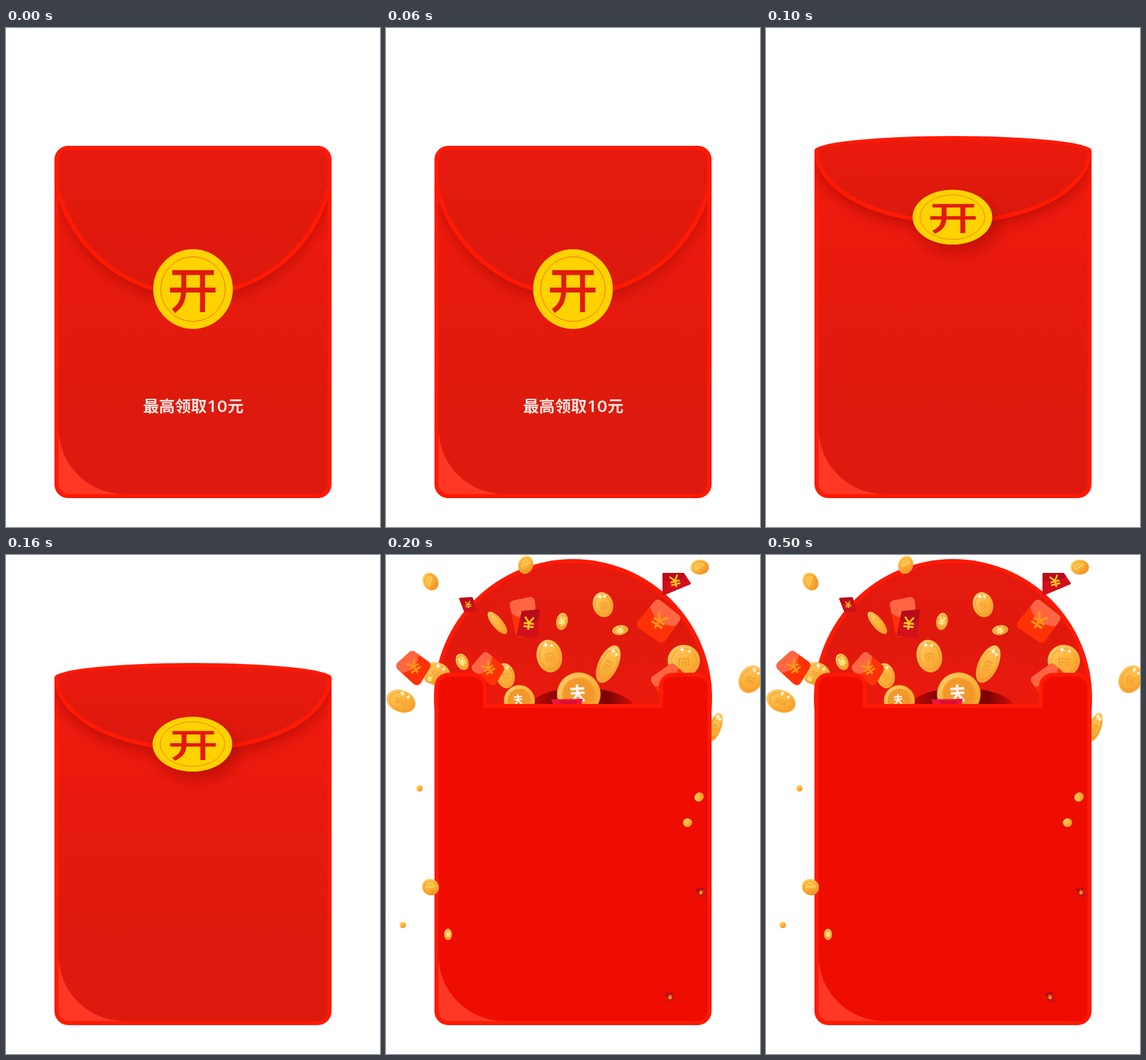
Write an HTML page with a canvas that moves like this. It is 648 px wide and 864 px high and loops after 0.7 s.

```html
<!DOCTYPE html>
<html lang="zh-CN">
<head>
<meta charset="utf-8">
<title>红包</title>
<style>
html, body { margin: 0; width: 100%; height: 100%; overflow: hidden; background: #fff; }
canvas { display: block; width: 648px; height: 864px; }
</style>
</head>
<body>
<canvas id="stage" width="648" height="864"></canvas>
<script>
const ctx = document.getElementById('stage').getContext('2d');
const TAU = Math.PI * 2, DEG = Math.PI / 180;
const EDGE = '#ff1a05', GOLD = '#ffd200', MARK = '#e21a0c';

function vertical(y0, y1, ...colors) {
  const g = ctx.createLinearGradient(0, y0, 0, y1);
  colors.forEach((c, i) => g.addColorStop(i / (colors.length - 1), c));
  return g;
}

function local(x, y, angle, draw) {
  ctx.save();
  ctx.translate(x, y);
  ctx.rotate(angle * DEG);
  draw();
  ctx.restore();
}

function ellipse(x, y, rx, ry) {
  const p = new Path2D();
  p.ellipse(x, y, rx, ry, 0, 0, TAU);
  return p;
}

function box(x, y, w, h, radii) {
  const p = new Path2D();
  p.roundRect(x, y, w, h, radii);
  return p;
}

function fill(path, style) {
  ctx.fillStyle = style;
  ctx.fill(path);
}

function shadow(alpha, blur, dx, dy) {
  ctx.shadowColor = `rgba(140,0,0,${alpha})`;
  ctx.shadowBlur = blur;
  ctx.shadowOffsetX = dx;
  ctx.shadowOffsetY = dy;
}

// Light corner at the lower left of the envelope
function fold() {
  const p = new Path2D('M91 693A114 114 0 0 0 205 807H109A18 18 0 0 1 91 789Z');
  fill(p, '#ff3826');
}

function envelope(top, r) {
  const outer = box(84, top, 480, 814 - top, [r, r, 24, 24]);
  const q = r ? 18 : 0;
  const inner = box(91, top + 7, 466, 800 - top, [q, q, 18, 18]);
  fill(outer, EDGE);
  fill(inner, vertical(204, 814, '#f21b0d', '#eb1a0d', '#e31a0d', '#dd1a0d', '#dd1a0d'));
  fold();
  return { outer, inner };
}

function seal(x, y, sy, markX) {
  ctx.save();
  ctx.translate(x, y);
  ctx.scale(1, sy);
  fill(ellipse(0, 0, 69, 69), GOLD);
  ctx.shadowColor = 'transparent';
  ctx.strokeStyle = '#e8690c';
  ctx.lineWidth = 1;
  ctx.stroke(ellipse(0, 0, 56, 56));
  ctx.translate(markX, 0);
  ctx.strokeStyle = MARK;
  ctx.lineWidth = 8.6;
  ctx.stroke(new Path2D('M-36-28.5H36M-40 1.8H39M16.5-28V40M-16-28V-2C-16 18-20 28-34 38'));
  ctx.restore();
}

function label() {
  ctx.fillStyle = '#fde6e2';
  ctx.textAlign = 'left';
  ctx.font = 'bold 27.6px "Noto Sans CJK SC", "Noto Sans CJK", sans-serif';
  ctx.fillText('最高领取', 237.5, 665);
  ctx.fillText('元', 384, 665);
  ctx.font = '600 27.6px Inter, sans-serif';
  ctx.textAlign = 'center';
  ctx.fillText('1', 356, 665);
  ctx.fillText('0', 374.5, 665);
}

function closed() {
  const { outer, inner } = envelope(204, 24);
  const flap = ellipse(324, 219, 246, 246);
  ctx.save();
  ctx.clip(inner);
  ctx.save();
  shadow(0.38, 22, 0, 9);
  fill(flap, EDGE);
  ctx.restore();
  fill(ellipse(324, 219, 239, 239), vertical(211, 458, '#e61a0e', '#dc190d'));
  ctx.restore();
  ctx.save();
  ctx.clip(outer);
  ctx.strokeStyle = EDGE;
  ctx.lineWidth = 7;
  ctx.stroke(box(87.5, 207.5, 473, 603, 20.5));
  ctx.restore();
  seal(324, 452, 1, 0);
  label();
}

// Flap seen at an angle: shallow arc above, deep arc below
function lens(rx, up, down) {
  const p = new Path2D();
  p.ellipse(324, 212, rx, up, 0, Math.PI, TAU);
  p.ellipse(324, 212, rx, down, 0, 0, Math.PI);
  return p;
}

function lifting() {
  const { outer } = envelope(212, 0);
  ctx.save();
  ctx.clip(outer);
  shadow(0.45, 24, 0, 10);
  fill(lens(240, 25, 127), EDGE);
  ctx.restore();
  fill(lens(240, 25, 127), EDGE);
  fill(lens(233, 18, 120), vertical(194, 332, '#ea1a0d', '#db190d'));
  ctx.save();
  shadow(0.42, 26, 8, 14);
  seal(323, 327.5, 0.69, 1.5);
  ctx.restore();
}

function yen(x, y, size, angle, color) {
  local(x, y, angle, () => {
    ctx.scale(size / 20, size / 20);
    ctx.strokeStyle = color;
    ctx.lineWidth = 3;
    ctx.stroke(new Path2D('M-7-10L0-1L7-10M0-1V10M-8 0H8M-8 5H8'));
  });
}

function coin(x, y, rx, ry, angle, look) {
  local(x, y, angle, () => {
    const g = ctx.createLinearGradient(-rx, -ry, rx, ry);
    g.addColorStop(0, look === 'small' ? '#ffe06a' : '#ffcf70');
    g.addColorStop(0.5, '#ffb53c');
    g.addColorStop(1, look === 'small' ? '#e97f16' : '#f59a2e');
    fill(ellipse(0, 0, rx, ry), g);
    if (Math.min(rx, ry) < 8 && look !== 'yen') return;
    ctx.strokeStyle = '#f29a2c';
    ctx.lineWidth = 1.2;
    ctx.stroke(ellipse(0.5, 0.5, rx * 0.78, ry * 0.78));
    if (look === 'small') {
      ctx.strokeStyle = '#ffe58a';
      ctx.stroke(new Path2D(`M${-rx * 0.5} ${ry * 0.3}Q0 0 ${rx * 0.5} ${-ry * 0.4}`));
    }
    if (look === 'shine') {
      ctx.strokeStyle = '#ed9a35';
      ctx.lineWidth = 1.6;
      ctx.save();
      ctx.scale(rx / 24, ry / 24);
      ctx.stroke(new Path2D('M-7 8V-3H7V8M-3 8V2H3V8'));
      ctx.restore();
      sparkle(-rx * 0.1, -ry * 0.7, 5);
      sparkle(rx * 0.35, -ry * 0.6, 4);
    }
  });
  if (look === 'yen') yen(x, y, Math.max(rx, ry) * 0.95, angle, '#fff0a0');
}

function sparkle(x, y, r) {
  const p = new Path2D();
  for (let i = 0; i < 8; i++) {
    const d = i % 2 ? r * 0.45 : r, a = i * TAU / 8;
    p.lineTo(x + d * Math.cos(a), y + d * Math.sin(a));
  }
  fill(p, '#fff6e0');
}

function rounded(pts, r) {
  const p = new Path2D(), n = pts.length;
  const [a, b] = [pts[0], pts[n - 1]];
  p.moveTo((a[0] + b[0]) / 2, (a[1] + b[1]) / 2);
  pts.forEach((c, i) => p.arcTo(...c, ...pts[(i + 1) % n], r));
  p.closePath();
  return p;
}

// Corners run from the top left, clockwise
function packet(a, b, c, d, dark, angle, size) {
  const mix = (p, q, k) => [p[0] + (q[0] - p[0]) * k, p[1] + (q[1] - p[1]) * k];
  const shape = rounded([a, b, c, d], dark ? 2 : 8);
  fill(shape, dark ? '#d0101a' : '#ff3207');
  ctx.save();
  ctx.clip(shape);
  const l = mix(a, d, 0.32), r = mix(b, c, 0.32), m = mix(mix(a, d, 0.68), mix(b, c, 0.68), 0.5);
  const flap = new Path2D();
  flap.moveTo(...a);
  flap.lineTo(...b);
  flap.lineTo(...r);
  flap.quadraticCurveTo(...m, ...l);
  flap.closePath();
  fill(flap, dark ? '#b90c18' : '#ff6543');
  ctx.restore();
  const mid = mix(mix(a, c, 0.5), mix(b, d, 0.5), 0.5);
  yen(...mid, size, angle, dark ? '#ffc51e' : '#ff9418');
}

function pocket() {
  const p = new Path2D('M87.5 228A20.5 20.5 0 0 1 108 207.5H151A20.5 20.5 0 0 1 171.5 228V261.5H476.5V228A20.5 20.5 0 0 1 497 207.5H540A20.5 20.5 0 0 1 560.5 228V790A20.5 20.5 0 0 1 540 810.5H108A20.5 20.5 0 0 1 87.5 790Z');
  fill(p, '#ee0d00');
  fold();
  ctx.strokeStyle = EDGE;
  ctx.lineWidth = 7;
  ctx.stroke(p);
}

function insides() {
  const g = ctx.createLinearGradient(245, 0, 430, 0);
  ['#cc0c08', '#8d0305', '#a00406', '#790204', '#d80e08'].forEach((c, i) => g.addColorStop(i / 4, c));
  ctx.save();
  ctx.beginPath();
  ctx.rect(170, 150, 310, 109);
  ctx.clip();
  fill(ellipse(338, 270, 95, 40), g);
  for (const [x, y, r, size] of [[231, 252, 27, 18], [334, 241, 38, 30]]) {
    fill(ellipse(x, y, r, r), '#ee8f24');
    coin(x, y, r - 1, r - 1, 0, 'plain');
    fill(ellipse(x, y, r * 0.72, r * 0.72), '#f3982a');
    yen(x - 2, y - 2, size, 176, '#fff3ea');
  }
  fill(new Path2D('M286 250L341 249L338 260H290Z'), '#f0143f');
  fill(new Path2D('M300 253L332 252L328 260H304Z'), '#d80d32');
  ctx.restore();
}

function open() {
  coin(570, 298, 11, 26, 20, 'shine');
  fill(ellipse(324, 248, 241, 241), EDGE);
  fill(ellipse(324, 248, 234, 234), vertical(14, 260, '#e61a0e', '#e0190d', '#ea1a0d'));
  insides();

  coin(88, 206, 24, 20, 20, 'shine');
  coin(207, 209, 16, 22, -12, 'shine');
  coin(376, 86, 17.5, 22, -15, 'shine');
  coin(193, 117.5, 9, 24, -40, 'plain');
  coin(283, 175, 22, 28.5, -12, 'shine');
  coin(385, 189, 17, 35, 25, 'shine');
  coin(516, 183, 28, 27.5, 0, 'shine');
  coin(26, 253, 26, 19, 22, 'shine');
  coin(632, 215, 20, 25, 28, 'shine');

  coin(77, 46, 13, 16, -30, 'small');
  coin(242, 17, 13, 16, 15, 'small');
  coin(543.5, 21, 16, 13, 0, 'small');
  coin(305, 115, 10, 15, 10, 'yen');
  fill(ellipse(410, 130, 14, 10), 'rgba(190,20,10,.5)');
  coin(406, 130, 14, 8.5, -8, 'yen');
  coin(132, 185, 10.5, 15, -25, 'yen');

  packet([126, 74], [150, 73], [158, 97], [136, 100], true, -10, 12);
  packet([479, 31], [516, 31], [529, 50], [479, 71], true, -15, 20);
  packet([213, 80], [257, 71], [264, 136], [226, 144], false, -8, 20);
  packet([235, 97], [267, 94], [262, 143], [226, 140], true, 6, 22);
  packet([470, 74], [513, 108], [479, 155], [431, 122], false, 34, 28);
  packet([14, 192], [45, 164], [80, 189], [55, 230], false, -34, 24);
  packet([145, 196], [172, 165], [207, 195], [187, 230], false, -36, 23);
  packet([456, 214], [496, 186], [530, 216], [486, 258], false, -30, 20);

  pocket();

  coin(76, 214, 10, 8, 20, 'yen');
  coin(58, 404, 5.5, 5.5, 0, 'small');
  coin(542.5, 419, 8.5, 7.5, -40, 'small');
  coin(522.5, 463.5, 8, 7.5, 0, 'small');
  coin(77, 575, 15, 14, 30, 'small');
  coin(29, 640.5, 5.5, 5.5, 0, 'small');
  coin(107.5, 657, 7, 10, 0, 'yen');
  packet([535, 577], [549, 576], [556, 591], [543, 593], true, 20, 8);
  packet([483, 758], [496, 757], [502, 773], [488, 774], true, 10, 8);
}

const poses = [closed, lifting, open];
let shown = -1;

function render(now) {
  const t = now % 700;
  const pose = t < 100 ? 0 : t < 200 ? 1 : 2;
  if (pose !== shown) {
    shown = pose;
    ctx.fillStyle = '#fff';
    ctx.fillRect(0, 0, 648, 864);
    poses[pose]();
  }
  requestAnimationFrame(tick);
}

const start = performance.now();
function tick() {
  render(performance.now() - start);
}
render(0);
</script>
</body>
</html>
```
